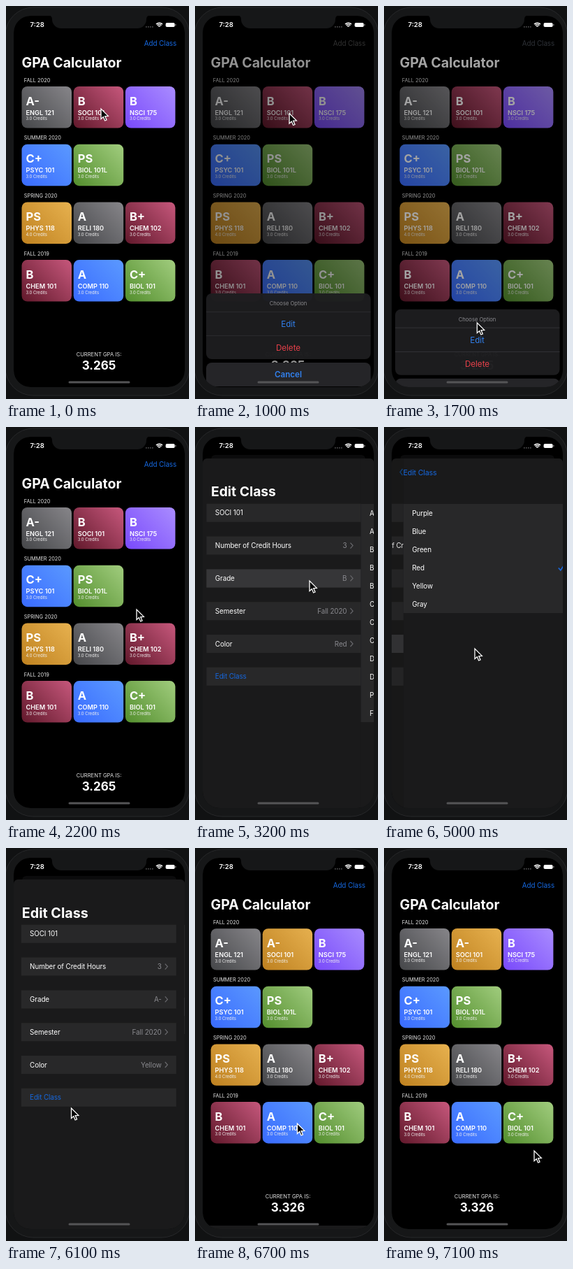
An HTML page with a canvas for the animation above (7200 ms loop, 262 px wide and 562 px high).

```html
<!DOCTYPE html>
<html lang="en">
<head>
<meta charset="utf-8">
<title>GPA Calculator</title>
<style>
html, body { margin: 0; width: 100%; height: 100%; overflow: hidden; background: #111213; }
canvas { display: block; }
</style>
</head>
<body>
<canvas id="stage" width="262" height="562"></canvas>
<script>
const ctx = document.getElementById('stage').getContext('2d');
const LOOP = 7200, STEP = 100;
const LEFT = 11, WIDTH = 245, TOP = 14, BOTTOM = 545;
const BLUE = '#1668e0', SHEET = '#1a1a1b', ROW = '#282829', PRESSED = '#363638', GREY = '#8a8a8f';

const GRADIENTS = {
  Gray: ['#47484b', '#858488'], Red: ['#641a2d', '#c4567a'], Purple: ['#7a4bfb', '#a88aff'],
  Blue: ['#3a6cff', '#5a98ff'], Green: ['#55902f', '#9fcb7c'], Yellow: ['#c08321', '#e6b04e']
};
const SEMESTERS = [
  ['FALL 2020', ['A-', 'ENGL 121', 'Gray'], ['B', 'SOCI 101', 'Red'], ['B', 'NSCI 175', 'Purple']],
  ['SUMMER 2020', ['C+', 'PSYC 101', 'Blue'], ['PS', 'BIOL 101L', 'Green']],
  ['SPRING 2020', ['PS', 'PHYS 118', 'Yellow', '4.0'], ['A', 'RELI 180', 'Gray'], ['B+', 'CHEM 102', 'Red']],
  ['FALL 2019', ['B', 'CHEM 101', 'Red'], ['A', 'COMP 110', 'Blue'], ['C+', 'BIOL 101', 'Green']]
];
const GRADES = ['A', 'A-', 'B+', 'B', 'B-', 'C+', 'C', 'C-', 'D+', 'D', 'PS', 'F'];
const COLORS = ['Purple', 'Blue', 'Green', 'Red', 'Yellow', 'Gray'];

// Moments of the taps that start each transition
const AT = {
  menu: 250, menuOff: 1660, modal: 2213, grade: 3175, gradeOff: 3680,
  color: 4758, colorOff: 5670, save: 6370
};
// Pointer stops: time, x, y
const POINTER = [
  [0, 136, 147], [800, 135, 153.5], [1050, 135, 153.5], [1560, 133, 454], [1680, 133, 454],
  [2150, 187, 261], [2350, 187, 261], [3000, 164, 220], [3250, 164, 220], [3580, 150, 150],
  [3720, 150, 150], [4500, 130, 317], [5050, 130, 317], [5560, 120, 228], [5700, 120, 228],
  [5980, 94, 377], [6100, 93.5, 372], [6300, 92, 363], [6400, 92, 363], [7050, 215, 433], [7200, 215, 433]
];

const lerp = (a, b, p) => a + (b - a) * p;
function spring(ms, rate = 18) {
  const x = Math.max(0, ms) / 1000 * rate;
  return 1 - (1 + x) * Math.exp(-x);
}

function box(x, y, w, h, r, fill) {
  ctx.beginPath();
  ctx.roundRect(x, y, w, h, r);
  ctx.fillStyle = fill;
  ctx.fill();
}

function line(points, color, width) {
  ctx.beginPath();
  points.forEach(([x, y]) => ctx.lineTo(x, y));
  ctx.strokeStyle = color;
  ctx.lineWidth = width;
  ctx.stroke();
}

// y is the middle of the capitals
function text(str, x, y, size, { color = '#fff', weight = 400, align = 'left', track = 0 } = {}) {
  ctx.font = `${weight} ${size}px Inter, sans-serif`;
  ctx.letterSpacing = `${track * size}px`;
  ctx.textAlign = align;
  ctx.fillStyle = color;
  ctx.fillText(str, x, y + size * .363);
}

function label(str, x, y, options) {
  text(str, x, y, 9.85, { track: -.01, ...options });
}

function faded(alpha, draw) {
  ctx.save();
  ctx.globalAlpha *= Math.min(1, Math.max(0, alpha));
  draw();
  ctx.restore();
}

function card(x, y, [grade, course, color, credits = '3.0']) {
  const fill = ctx.createLinearGradient(x + 4, y + 60, x + 68, y);
  GRADIENTS[color].forEach((c, i) => fill.addColorStop(i, c));
  box(x, y, 71.5, 59.5, 8, fill);
  text(grade, x + 6, y + 20.7, 16.5, { weight: 700 });
  text(course, x + 6, y + 37.3, 9.2, { weight: 600 });
  text(credits + ' Credits', x + 6, y + 46.3, 5.9, { color: '#f0f0f0' });
}

function mainScreen(saved, menu) {
  faded(1 - menu, () => label('Add Class', 244, 53, { color: BLUE, align: 'right' }));
  faded(menu, () => label('Add Class', 244, 53, { color: '#555', align: 'right' }));
  text('GPA Calculator', 22.5, 80.5, 19.5, { weight: 700 });
  SEMESTERS.forEach(([name, ...cards], row) => {
    const y = 115 + row * 82.7;
    text(name, 25.8, y - 9, 7.4, { color: '#e4e4e4' });
    cards.forEach((c, col) => {
      const edited = saved && c[1] === 'SOCI 101';
      card(22.5 + col * 74.2, y, edited ? ['A-', c[1], 'Yellow'] : c);
    });
  });
  text('CURRENT GPA IS:', 133, 498, 7.6, { align: 'center', color: '#e4e4e4' });
  text(saved ? '3.326' : '3.265', 133, 514, 17, { weight: 700, align: 'center' });
}

function actionSheet(p) {
  if (p < .001) return;
  faded(.43 * p, () => box(LEFT, TOP, WIDTH, BOTTOM - TOP, 0, '#000'));
  ctx.save();
  ctx.translate(0, (1 - p) * 140);
  box(16, 411, 235.5, 94, 8, 'rgba(30,30,32,.96)');
  box(16, 437, 235.5, .6, 0, '#39393c');
  box(16, 471.5, 235.5, .6, 0, '#39393c');
  box(16, 510, 235.5, 34, 8, '#252528');
  text('Choose Option', 133.5, 425, 7.6, { color: GREY, align: 'center' });
  text('Edit', 133.5, 454.5, 11.6, { color: '#3282f0', align: 'center' });
  text('Delete', 133.5, 488.5, 11.6, { color: '#e8404a', align: 'center' });
  text('Cancel', 133.5, 527, 11.6, { color: '#3282f0', align: 'center', weight: 600 });
  ctx.restore();
}

function form(t, gradePush, colorPush) {
  const rows = [
    ['SOCI 101'],
    ['Number of Credit Hours', '3'],
    ['Grade', t < AT.gradeOff ? 'B' : 'A-', t < AT.gradeOff ? +(t > 3110) : gradePush],
    ['Semester', 'Fall 2020'],
    ['Color', t < AT.colorOff ? 'Red' : 'Yellow', t < AT.colorOff ? +(t > 4570) : colorPush],
    ['Edit Class']
  ];
  rows.forEach(([name, value, pressed = 0], i) => {
    const y = 109.8 + i * 46.8, mid = y + 13;
    box(22, y, 222, 26, 0, ROW);
    faded(pressed, () => box(22, y, 222, 26, 0, PRESSED));
    label(name, 34.4, mid, { color: i === 5 ? BLUE : '#fff' });
    if (!value) return;
    label(value, 223, mid, { color: GREY, align: 'right' });
    line([[228, mid - 4], [231.6, mid], [228, mid + 4]], '#68686c', 1.2);
  });
}

function picker(options, chosen, tapped, push) {
  if (push < .001) return;
  const x = LEFT + WIDTH * (1 - push);
  faded(.1 * push, () => box(LEFT, 45, WIDTH, 500, 0, '#000'));
  box(x, 45, WIDTH, 500, 0, SHEET);
  options.forEach((name, i) => {
    const y = 110 + i * 26, mid = y + 13;
    box(x, y, WIDTH, 26.1, 0, i === tapped ? PRESSED : ROW);
    label(name, x + 12.4, mid);
    if (i === chosen)
      line([[x + 222, mid + .5], [x + 225, mid + 4], [x + 230, mid - 4]], BLUE, 1.6);
  });
}

function editSheet(t, p) {
  if (p < .001) return;
  const gradePush = spring(t - AT.grade) - spring(t - AT.gradeOff);
  const colorPush = spring(t - AT.color) - spring(t - AT.colorOff);
  const push = Math.max(gradePush, colorPush);
  ctx.save();
  ctx.translate(0, (1 - p) * 500);
  ctx.beginPath();
  ctx.roundRect(LEFT, 45, WIDTH, 540, 6);
  ctx.clip();
  box(LEFT, 45, WIDTH, 540, 0, SHEET);

  ctx.save();
  ctx.translate(-.3 * WIDTH * push, 0);
  form(t, gradePush, colorPush);
  ctx.restore();

  const picked = (off, before, after) => t > off - 60 ? [after, after] : [before, -1];
  picker(GRADES, ...picked(AT.gradeOff, 3, 1), gradePush);
  picker(COLORS, ...picked(AT.colorOff, 3, 4), colorPush);

  // The large title shrinks into the back button
  const shrink = push ** 1.2;
  const x = lerp(22.8, 28, shrink), y = lerp(93, 62.5, shrink), size = lerp(19.7, 9.8, shrink);
  faded(1.15 - push * 1.3, () => text('Edit Class', x, y, size, { weight: 700 }));
  faded(push * 1.3 - .15, () => text('Edit Class', x, y, size, { color: BLUE, track: -.015 }));
  faded(push ** 6, () => line([[26.5, 60], [23, 64.5], [26.5, 69]], '#0d55aa', 1.4));
  ctx.restore();
}

function statusBar() {
  ctx.beginPath();
  ctx.moveTo(61, 13);
  ctx.quadraticCurveTo(66, 14, 66, 19);
  ctx.arcTo(66, 32, 80, 32, 13);
  ctx.arcTo(201, 32, 201, 19, 13);
  ctx.lineTo(201, 19);
  ctx.quadraticCurveTo(201, 14, 206, 13);
  ctx.fillStyle = '#161718';
  ctx.fill();

  text('7:28', 34.6, 26.9, 9.5, { weight: 600 });
  for (let i = 0; i < 4; i++) box(200 + i * 3, 29, 1.7, 1.7, .8, '#5c5c5e');
  ctx.strokeStyle = '#fff';
  ctx.lineWidth = 1.4;
  for (const r of [2, 4.2, 6.4]) {
    ctx.beginPath();
    ctx.arc(219.5, 30.6, r, -Math.PI * .75, -Math.PI * .25);
    ctx.stroke();
  }
  box(228.6, 23.9, 13, 6.2, 1.8, '#fff');
  box(242.4, 25.8, 1, 2.4, .5, '#8a8a8a');
}

function pointer(t) {
  const i = POINTER.findIndex(stop => stop[0] > t);
  const [t0, x0, y0] = POINTER[i - 1], [t1, x1, y1] = POINTER[i];
  const u = (t - t0) / (t1 - t0), p = u * u * (3 - 2 * u);
  ctx.save();
  ctx.translate(lerp(x0, x1, p), lerp(y0, y1, p));
  ctx.beginPath();
  [[0, 0], [0, 14.5], [3.3, 11.5], [5.6, 17], [8, 16], [5.7, 10.6], [10.3, 10.4]]
    .forEach(([x, y]) => ctx.lineTo(x, y));
  ctx.closePath();
  ctx.fillStyle = '#000';
  ctx.strokeStyle = '#fff';
  ctx.lineWidth = 1.3;
  ctx.fill();
  ctx.stroke();
  ctx.restore();
}

function draw(t) {
  const menu = spring(t - AT.menu) - spring(t - AT.menuOff);
  const modal = spring(t - AT.modal, 20) - spring(t - AT.save, 20);

  ctx.fillStyle = '#111213';
  ctx.fillRect(0, 0, 262, 562);
  box(-1, 2, 264, 555, 40, '#161718');
  ctx.strokeStyle = '#27282a';
  ctx.lineWidth = 1;
  ctx.stroke();

  ctx.save();
  ctx.beginPath();
  ctx.roundRect(LEFT, TOP, WIDTH, BOTTOM - TOP, 24);
  ctx.clip();
  ctx.fillStyle = '#000';
  ctx.fill();

  // The main screen shrinks back behind the sheet
  ctx.save();
  const scale = 1 - .1 * modal;
  ctx.translate(133.5, TOP + 26 * modal);
  ctx.scale(scale, scale);
  ctx.translate(-133.5, -TOP);
  faded(modal, () => box(LEFT, TOP, WIDTH, BOTTOM - TOP, 6, '#101011'));
  mainScreen(t > AT.save, menu);
  ctx.restore();
  faded(.3 * modal, () => box(LEFT, TOP, WIDTH, BOTTOM - TOP, 0, '#000'));

  actionSheet(menu);
  editSheet(t, modal);
  box(89.5, 536.5, 88, 3, 1.5, '#545456');
  ctx.restore();

  statusBar();
  pointer(t);
}

function tick() {
  const now = (performance.now() + 1) % LOOP;
  draw(Math.floor(now / STEP) * STEP);
  requestAnimationFrame(tick);
}
tick();
</script>
</body>
</html>
```
